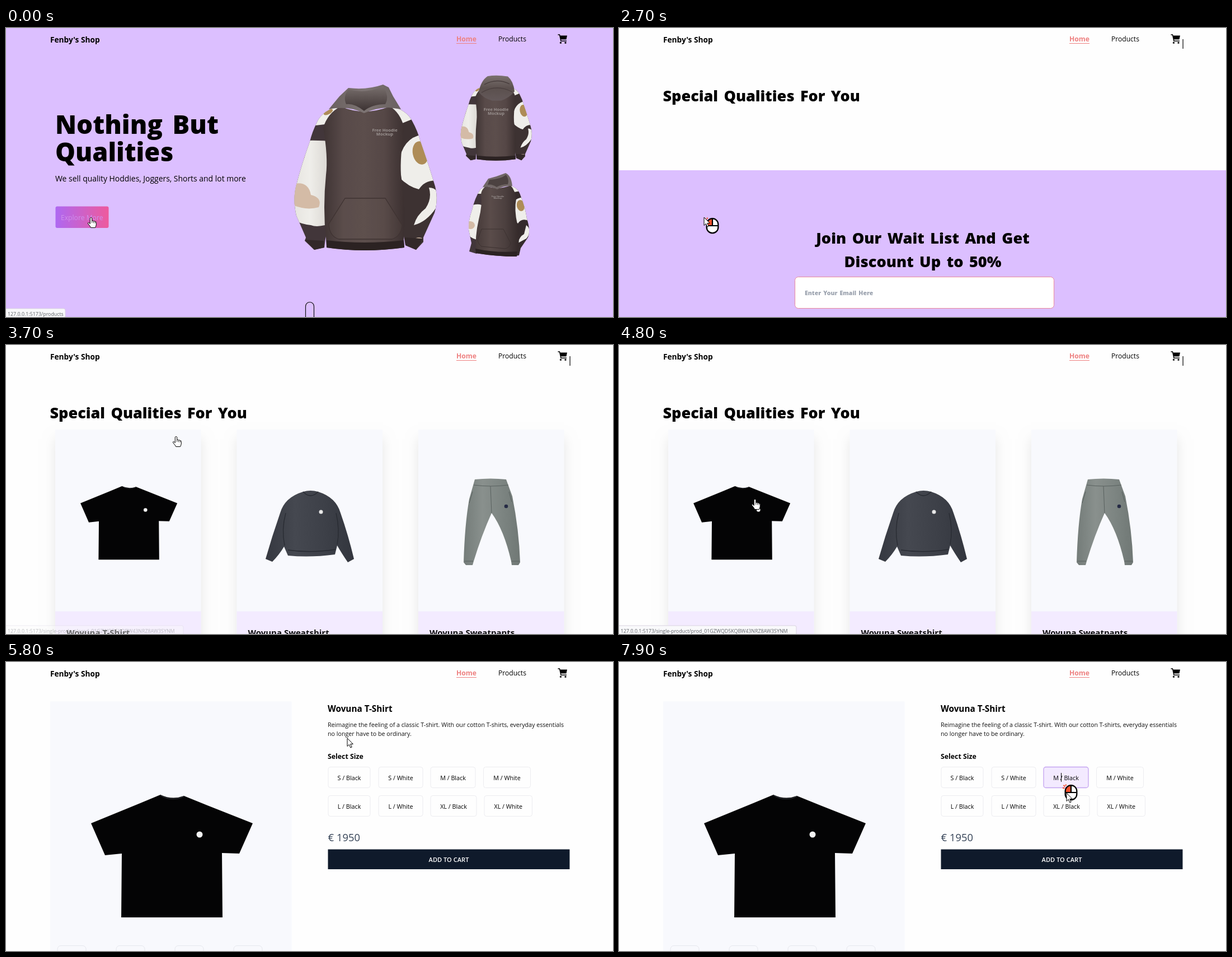
These frames come from a looping animation (1085 px wide and 516 px high, 8 s). An HTML page with a canvas:

```html
<!DOCTYPE html>
<html lang="en">
<head>
<meta charset="utf-8">
<title>Shop walkthrough</title>
<style>
html, body { margin: 0; width: 100%; height: 100%; overflow: hidden; background: #dcbfff; }
canvas { display: block; }
</style>
</head>
<body>
<canvas id="stage" width="1085" height="516"></canvas>
<script>
const ctx = document.getElementById('stage').getContext('2d');
const W = 1085, H = 516, LOOP = 8000, STEP = 100;
const LILAC = '#dcbfff', PAPER = '#fefefe', CORAL = '#ee8080', PANEL = '#f8f9fd', NAVY = '#0f1a2b';
const WHITE = '#efeeea', TAN = '#ae8c57', BEIGE = '#d4bba6', BROWN = '#42363a';

// Moments of the walkthrough, ms
const T = { click1: 2500, list: 2600, cards: 3000, click2: 5100, detail: 5200, product: 5500, click3: 7800 };
const CARET = [[100, 700], [1200, 1800], [2300, 2900], [3400, 3900], [4400, 5300], [5900, 6400], [7000, 7500]];
const CLICKS = [[T.click1, 3300, 152, 338], [T.click2, 5700, 243, 275], [T.click3, LOOP, 793, 218]];
const TRAIL = [
  [0, 152, 338], [3500, 152, 338], [3700, 304, 163], [4000, 300, 205], [4600, 243, 275],
  [5200, 243, 275], [5800, 610, 136], [6300, 655, 150], [6800, 740, 190], [7200, 793, 218],
  [7800, 793, 218], [7900, 800, 234], [8000, 806, 246]
];

const within = (t, [a, b]) => t >= a && t < b;

function text(str, x, y, size, { weight = 400, color = '#000', align = 'left' } = {}) {
  ctx.font = `${weight} ${size}px "Open Sans", "Noto Sans", sans-serif`;
  ctx.wordSpacing = weight === 800 ? `${size * .125}px` : '0px';
  ctx.fillStyle = color;
  ctx.textAlign = align;
  ctx.fillText(str, x, y);
}

function rect(x, y, w, h, fill) {
  ctx.fillStyle = fill;
  ctx.fillRect(x, y, w, h);
}

function box(x, y, w, h, r, fill, stroke, line = 1) {
  ctx.beginPath();
  ctx.roundRect(x, y, w, h, r);
  if (fill) { ctx.fillStyle = fill; ctx.fill(); }
  if (stroke) { ctx.strokeStyle = stroke; ctx.lineWidth = line; ctx.stroke(); }
}

function shape(d, fill, stroke, line = 1) {
  const p = new Path2D(d);
  if (fill) { ctx.fillStyle = fill; ctx.fill(p); }
  if (stroke) { ctx.strokeStyle = stroke; ctx.lineWidth = line; ctx.stroke(p); }
}

function oval(x, y, rx, ry, fill, turn = 0) {
  ctx.beginPath();
  ctx.ellipse(x, y, rx, ry, turn, 0, 7);
  ctx.fillStyle = fill;
  ctx.fill();
}

function blend(x0, y0, x1, y1, ...colors) {
  const g = ctx.createLinearGradient(x0, y0, x1, y1);
  colors.forEach((c, i) => g.addColorStop(i / (colors.length - 1), c));
  return g;
}

function placed(matrix, draw) {
  ctx.save();
  ctx.transform(...matrix);
  draw();
  ctx.restore();
}

// Fills an outline, then draws its pattern inside it
function sleeve(d, fill, pattern) {
  shape(d, fill);
  ctx.save();
  ctx.clip(new Path2D(d));
  pattern();
  ctx.restore();
}

function hoodie(back) {
  sleeve('M600 138Q566 146 556 168Q547 186 543 203Q528 245 519 280Q512 305 519 335L536 374L534 380L551 396L569 392L571 376L590 300V150Z', BROWN, () => {
    shape('M553 174L568 138H602L570 172Z', WHITE);
    shape('M505 204Q540 198 590 203V345Q560 358 545 352Q525 350 505 338Z', blend(512, 0, 574, 0, '#e6e4df', WHITE, '#dcd9d4'));
    oval(528, 229, 6, 9, TAN, .3);
    oval(576, 150, 9, 4, TAN, -.5);
    shape('M508 280Q540 270 545 298Q566 303 559 320Q535 327 508 314Z', BEIGE);
  });
  sleeve('M684 138Q716 146 726 166Q736 184 741 203Q756 246 765 276Q774 302 766 330L746 374L746 382L733 396L714 388L711 372L695 300V150Z', '#3d3232', () => {
    shape('M688 138H714L728 162L706 171Z', WHITE);
    shape('M702 242Q708 196 745 190L782 275Q752 266 738 288Q720 284 702 266Z', WHITE);
    oval(741, 223, 14, 21, TAN, -.2);
    shape('M756 285Q780 285 768 322Q752 346 729 352Q734 334 750 322Q762 304 756 285Z', WHITE);
    oval(738, 377, 7, 3, BEIGE);
  });
  shape('M598 140Q640 158 686 140Q704 150 712 178Q704 230 706 262Q716 320 711 378L712 392Q640 402 573 392L572 378Q566 320 572 262Q576 230 567 178Q575 152 598 140Z',
    blend(566, 0, 714, 0, '#3e3333', '#584a49', '#5c4e4c', '#554746', '#3a2f2f'));
  shape('M573 379Q640 387 711 379L712 392Q640 402 573 392Z', '#2b2222');
  shape('M534 378L568 380L569 392L551 396ZM746 376L713 374L714 388L733 396Z', '#322828');
  if (back) {
    shape('M580 158Q588 118 612 103Q645 98 684 104Q704 120 708 156Q690 178 660 188H628Q596 180 580 158Z', blend(0, 102, 0, 188, '#7a706e', '#5b504e', '#64595a'));
    shape('M600 132Q644 108 690 130M590 160Q644 128 700 158', null, '#483d3d', 2.5);
    return;
  }
  shape('M606 304H678L708 352Q706 372 690 377H595Q578 372 577 350Z', 'rgba(105,90,88,.14)', '#3f3332', 1.3);
  shape('M577 145L596 122L612 107Q645 111 674 101L684 106L692 122L706 145L684 142Q660 143 640 152Q612 138 577 145Z', blend(577, 0, 706, 0, '#6a605f', '#7d7473', '#69605f'));
  shape('M612 110Q645 118 674 104Q686 122 678 136Q655 136 640 148Q622 134 608 136Q602 122 612 110Z', blend(0, 104, 0, 148, '#786f6d', '#5b5150', '#3c3232'));
}

// Three-quarter view
function turnedHoodie() {
  sleeve('M856 283L848 288Q838 303 833 325Q826 345 827 360L832 384L828 399L841 403L850 390V320Z', BROWN, () => {
    shape('M842 296L850 284L860 284L850 296Z', WHITE);
    shape('M822 322Q838 312 850 316V352L844 378Q834 378 822 366Z', WHITE);
    oval(830, 352, 8, 7, BEIGE, .2);
  });
  sleeve('M900 281Q916 285 920 300Q928 320 931 340Q938 362 933 374L920 393L917 406L908 407L898 340Z', '#352b2c', () => {
    shape('M896 278H916L920 291L908 293Z', WHITE);
    shape('M904 318Q908 303 926 302L936 345Q922 338 915 349L905 340Z', WHITE);
    oval(920, 317, 7, 10, TAN, -.2);
    shape('M930 352Q942 362 930 376L915 384Q918 372 926 368Z', WHITE);
  });
  shape('M858 282Q880 290 902 281Q910 290 912 305Q908 325 914 350Q920 380 913 408Q876 408 840 402Q838 372 845 342Q852 315 849 297Q850 288 858 282Z',
    blend(840, 0, 918, 0, '#463a39', '#5a4c4a', '#4c403f', '#332929'));
  shape('M839 394Q876 402 914 399L913 408Q876 408 840 402Z', '#2b2222');
  shape('M850 359H889L902 384Q900 393 892 394L850 390Q844 386 843 378Z', null, '#3d3231', 1);
  shape('M852 284L862 269Q878 265 893 259Q903 263 905 282Q890 281 878 288Q866 282 852 284Z', '#716766');
  shape('M864 271Q884 270 894 262Q900 272 897 279Q886 279 877 284Q868 278 861 280Z', '#4c4241');
}

function printed(x, y, size) {
  const style = { weight: 700, color: '#9b9391', align: 'center' };
  text('Free Hoodie', x, y, size, style);
  text('Mockup', x, y + size * .9, size, style);
}

function shirt() {
  shape('M276 237Q297 247 318 239L360 256L441 288L417 342L386 341L387 456H206L207 342L177 345L152 288L240 252Z', '#040405');
  shape('M276 238Q297 250 318 240', null, '#25272b', 1.5);
  oval(346, 308, 5.5, 5.5, '#f4f4f4');
}

function sweatshirt() {
  shape('M531 262Q544 258 558 262Q590 272 598 300Q612 340 622 382L611 388Q600 372 592 358L588 374Q544 380 504 376L497 360Q488 375 476 387L464 382Q476 340 490 300Q498 272 531 262Z',
    blend(464, 0, 622, 0, '#353840', '#454850', '#3d4048', '#33363e'));
  shape('M531 262Q544 276 558 262M504 366Q544 372 589 365M498 358Q492 330 500 300M592 356Q597 330 590 300', null, '#282b32', 1.3);
  oval(563, 298, 3.5, 3.5, '#e8e8e8');
}

function sweatpants() {
  shape('M838 240Q866 237 894 240L905 270Q917 330 919 388L916 393H904L903 386Q890 330 868 300Q850 340 836 386L834 393H822L818 388Q820 320 828 275Z',
    blend(818, 0, 919, 0, '#747c79', '#89908d', '#7d8582', '#707875'));
  shape('M836 250Q866 254 898 250M866 252L868 300M834 262L828 282M899 262L904 280M820 386H835M903 386H918', null, '#59615f', 1);
  oval(894, 288, 3.3, 3.3, '#262b45');
}

function header() {
  text("Fenby's Shop", 79, 26, 13.7, { weight: 700 });
  text('Home', 805, 24, 12.2, { weight: 700, color: CORAL });
  rect(805, 27, 36, 1, CORAL);
  text('Products', 880, 24, 12.1);
  shape('M990 13.5H1003L1001.5 20.5H991.5Z', '#000');
  shape('M986.5 12H989.5L992 23.3H1002', null, '#000', 1.5);
  oval(991.5, 26.3, 1.6, 1.6, '#000');
  oval(1000, 26.3, 1.6, 1.6, '#000');
}

function waitList(top) {
  const title = { weight: 800, align: 'center' };
  rect(0, top, W, H - top, LILAC);
  text('Join Our Wait List And Get', 543, top + 131, 27.2, title);
  text('Discount Up to 50%', 543, top + 173, 27.2, title);
  box(314.5, top + 190.5, 463, 56, 6, '#fff', '#e9899a');
  text('Enter Your Email Here', 332, top + 223, 10.55, { weight: 800, color: '#9ca3af' });
}

function status(url, width, alpha) {
  ctx.globalAlpha = alpha;
  box(-2, 501, width + 2, 20, [0, 3, 0, 0], '#f9f9fb', '#d9d3e0');
  text(url, 3, 514, 8.85, { color: '#5f6368' });
  ctx.globalAlpha = 1;
}

function heroPage() {
  rect(0, 0, W, H, LILAC);
  text('Nothing But', 88, 189, 45.7, { weight: 800 });
  text('Qualities', 88, 238, 45.2, { weight: 800 });
  text('We sell quality Hoddies, Joggers, Shorts and lot more', 88, 274, 13.93);
  box(88.5, 318.5, 95, 38.5, 3, blend(88, 0, 184, 0, '#ae68f2', '#ee5a9c'));
  text('Explore More', 98, 343, 12.15, { color: '#cf90ec' });
  hoodie();
  printed(677, 185, 7.6);
  placed([.5, 0, 0, .513, 555, 33.2], () => hoodie(true));
  printed(876, 148, 7.5);
  turnedHoodie();
  printed(879, 302, 3.8);
  box(535.5, 489.5, 15, 50, 7.5, null, '#111', 1.2);
}

function card(x, name, draw) {
  ctx.save();
  ctx.shadowColor = 'rgba(0,0,0,.09)';
  ctx.shadowBlur = 20;
  ctx.shadowOffsetY = 16;
  rect(x, 151, 260.5, 440, PANEL);
  ctx.restore();
  rect(x, 475.5, 260.5, 60, '#f3ebff');
  text(name, x + 20, 519, 15, { weight: 700, color: '#111' });
  draw();
}

function listPage(loaded) {
  rect(0, 0, W, H, PAPER);
  if (loaded) {
    card(88, 'Wovuna T-Shirt', () => placed([.599, 0, 0, .599, 42, 110], shirt));
    card(412.5, 'Wovuna Sweatshirt', sweatshirt);
    card(737, 'Wovuna Sweatpants', sweatpants);
  } else {
    waitList(254);
  }
  text('Special Qualities For You', 78.5, 131, 27, { weight: 800 });
}

function option(label, x, y, w, picked) {
  box(x + .5, y + .5, w - 1, 37, 4, picked ? '#f3eaff' : PAPER, picked ? '#c4a3f0' : '#ececf0', picked ? 1.3 : 1);
  text(label, x + w / 2, y + 23.5, 10.75, { align: 'center' });
}

function buyBlock(sizeY, priceY, price) {
  text('Select Size', 575, sizeY, 12.3, { weight: 700 });
  text(price, 575.5, priceY, 18.3, { color: '#334155' });
  rect(575.5, priceY + 14.5, 432, 35.5, NAVY);
  text('ADD TO CART', 791.5, priceY + 37, 11.1, { weight: 600, color: '#fff', align: 'center' });
}

function emptyDetail() {
  rect(79, 76, 432, 13.5, '#f1f1f1');
  shape('M87.5 79.5L83.5 83L87.5 86.5M502.5 79.5L506.5 83L502.5 86.5', null, '#555', 1.6);
  buyBlock(118, 175, '€');
  waitList(296);
}

function productDetail(picked) {
  rect(79, 70.5, 431.5, 446, PANEL);
  shirt();
  for (let i = 0; i < 4; i++) box(92 + 105 * i, 506.5, 51, 40, 6, null, '#e6e8ee');
  text('Wovuna T-Shirt', 575, 89, 15.3, { weight: 700 });
  text('Reimagine the feeling of a classic T-shirt. With our cotton T-shirts, everyday essentials', 575, 115.5, 10.68, { color: '#111' });
  text('no longer have to be ordinary.', 575, 131.5, 10.68, { color: '#111' });
  option('S / Black', 575.5, 187, 76);
  option('S / White', 665.5, 187, 80);
  option('M / Black', 758.5, 187, 81, picked);
  option('M / White', 853, 187, 85);
  option('L / Black', 575.5, 238, 76);
  option('L / White', 665.5, 238, 80);
  option('XL / Black', 758.5, 238, 83);
  option('XL / White', 854.5, 238, 86.5);
  buyBlock(173, 320, '€ 1950');
  if (picked) rect(790, 198, 1, 16, '#000');
}

function pointerAt(t) {
  const i = Math.max(1, TRAIL.findIndex(k => k[0] > t));
  const [t0, x0, y0] = TRAIL[i - 1], [t1, x1, y1] = TRAIL[i];
  const u = (t - t0) / (t1 - t0), e = u * u * (3 - 2 * u);
  return [x0 + (x1 - x0) * e, y0 + (y1 - y0) * e];
}

function arrow() {
  shape('M0 0V14.5L3.4 11.4L5.8 17L8.2 16L5.8 10.5H10.3Z', '#fff', '#000');
}

function hand() {
  shape('M-1.7 1.5Q0 -1 1.7 1.5V6.5Q3.4 5.2 4.5 7Q6.2 6 7.2 7.8Q9.2 7.2 9.3 9.5V13Q9 16 7.5 18.5H-.3Q-2 15 -5 12Q-6.6 9.5 -4.4 9.3L-1.7 11.5Z', '#fff', '#000');
  shape('M1.7 6.5V10M4.5 7.2V10.4M7.2 8V10.8', null, '#000', .8);
}

// Mouse badge with the left button lit
function badge() {
  shape('M-10 0V-2Q-10 -13 0 -13V0Z', '#f4502c');
  shape('M0 -13Q10 -13 10 -2V3Q10 13 0 13Q-10 13 -10 3V0H0Z', '#fff');
  box(-10.3, -12.8, 20.6, 26, 10.3, null, '#000', 2.3);
  shape('M-10 0H10M0 -12.5V0', null, '#000', 2.2);
  shape('M-15 -8.5L-11.5 -7.5M-13.5 -13L-10.5 -10.5M-9.5 -14.5L-8.8 -12', null, '#f4502c', 2);
}

function render(t) {
  ctx.setTransform(1, 0, 0, 1, 0, 0);
  const hero = t < T.list, list = !hero && t < T.detail;
  if (hero) heroPage();
  else if (list) listPage(t >= T.cards);
  else {
    rect(0, 0, W, H, PAPER);
    t < T.product ? emptyDetail() : productDetail(t >= T.click3);
  }
  header();
  if (CARET.some(span => within(t, span))) rect(1007.5, 20, 1.2, 17, '#000');

  const overCard = list && t >= 3600;
  if (hero) status('127.0.0.1:5173/products', 106, 1);
  if (overCard) {
    const alpha = Math.min(1, Math.max(0, (t - 3660) / 100));
    status('127.0.0.1:5173/single-product/prod_01GZWQD5KQBW43NRZ8AW3SYNM', 317, alpha);
  }

  for (const [from, to, x, y] of CLICKS)
    if (within(t, [from, to])) placed([1, 0, 0, 1, x + 15, y + 15], badge);
  const [x, y] = pointerAt(t);
  placed([1, 0, 0, 1, x, y], hero || overCard ? hand : arrow);
}

let start;
function tick(now) {
  start ??= now;
  const t = (now - start) % LOOP;
  render(Math.floor(t / STEP) * STEP);
  requestAnimationFrame(tick);
}
render(0);
requestAnimationFrame(tick);
</script>
</body>
</html>
```
